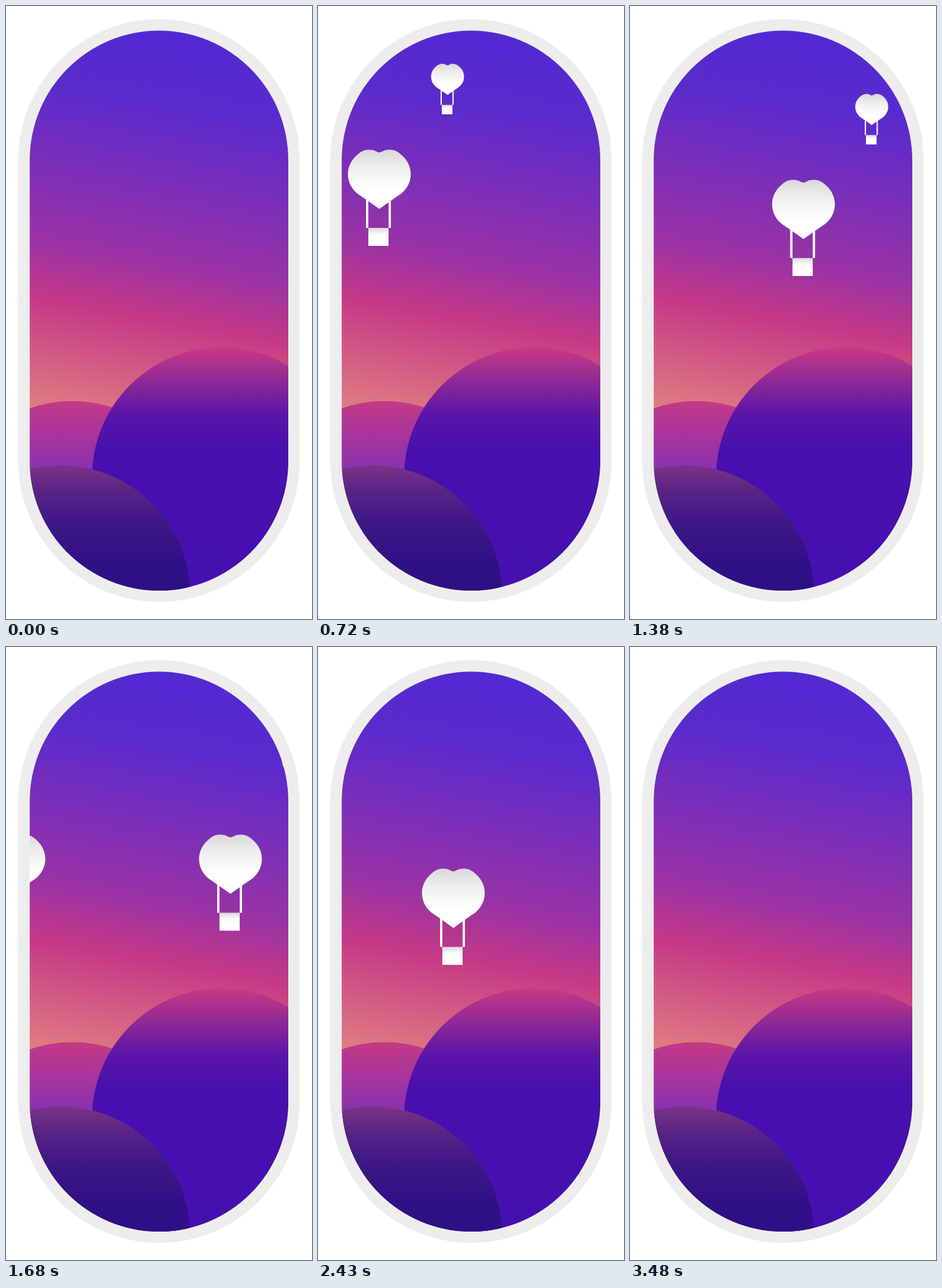
Write an HTML page with a canvas that moves like this. It is 529 by 1058 pixels and loops after 3.54 s.

```html
<!DOCTYPE html>
<html lang="en">
<head>
<meta charset="utf-8">
<title>Balloons at dusk</title>
<style>
  html, body { margin: 0; width: 100%; height: 100%; overflow: hidden; background: #fff; }
  canvas { display: block; width: 529px; height: 1058px; }
</style>
</head>
<body>
<canvas id="stage"></canvas>
<script>
const W = 529, H = 1058, LOOP = 3540, STEP = 30;
const SPEED = { x: 0.2938, y: 0.0788 }; // px per ms

const canvas = document.getElementById('stage');
const ctx = canvas.getContext('2d');
const ratio = window.devicePixelRatio || 1;
canvas.width = W * ratio;
canvas.height = H * ratio;

function gradient(x0, y0, x1, y1, stops) {
  const g = ctx.createLinearGradient(x0, y0, x1, y1);
  for (const [at, color] of stops) g.addColorStop(at, color);
  return g;
}

function pill(x, y, w, h) {
  const p = new Path2D();
  p.roundRect(x, y, w, h, w / 2);
  return p;
}

const frame = pill(21.2, 22.5, 486.6, 1006);
const view = pill(41, 42.5, 447, 966.5);

// Sky runs at 190deg, like a CSS gradient over the inner pill
const angle = 190 * Math.PI / 180;
const dx = Math.sin(angle) * 515, dy = -Math.cos(angle) * 515;
const sky = gradient(264.5 - dx, 525.5 - dy, 264.5 + dx, 525.5 + dy, [
  [0, '#4f29d4'], [0.16, '#5a2bcc'], [0.42, '#9a33a4'],
  [0.515, '#c43985'], [0.7, '#df7f80'], [1, '#e8a07c']
]);

const R = 223.5;
const hills = [
  { x: 114.5, top: 682, stops: [[0, '#c43985'], [0.19, '#9a33a4'], [0.4, '#6a2dc3']] },
  { x: 372.3, top: 589, stops: [[0, '#c83a83'], [0.12, '#932a95'], [0.26, '#5a15a8'], [0.4, '#4510ae'], [1, '#4510b0']] },
  { x: 95, top: 793.3, stops: [[0, '#7a3386'], [0.1, '#582484'], [0.22, '#3d1886'], [0.38, '#2e1084'], [1, '#2c1084']] }
].map(h => ({ ...h, fill: gradient(0, h.top, 0, h.top + 2 * R, h.stops) }));

// Balloon parts are placed around the heart's top centre
const heart = new Path2D(
  'M0 4.8C-5 4.8-6 0-18 0C-27 0-33 4-40 10.5C-49 19-54.3 30-54.3 42' +
  'C-54.3 56-48 66.5-40 74C-37 77-30 81-23 86L0 102.3' +
  'L23 86C30 81 37 77 40 74C48 66.5 54.3 56 54.3 42' +
  'C54.3 30 49 19 40 10.5C33 4 27 0 18 0C6 0 5 4.8 0 4.8Z');
const heartFill = gradient(0, 0, 0, 102, [[0, '#d9d9d9'], [0.3, '#efeeef'], [0.55, '#fbfafb'], [0.72, '#fff']]);
const basketFill = gradient(0, 135, 0, 166, [[0, '#d9d9d9'], [0.35, '#fbfafb'], [0.6, '#fff']]);

// Position of each balloon at time `at`
const balloons = [
  { at: 720, x: 106, y: 248, size: 1 },
  { at: 720, x: 224, y: 99.8, size: 0.525 },
  { at: 2430, x: 234, y: 382.6, size: 1 }
];

function drawBalloon(b, t) {
  ctx.save();
  ctx.translate(b.x + SPEED.x * (t - b.at), b.y + SPEED.y * (t - b.at));
  ctx.scale(b.size, b.size);
  ctx.fillStyle = '#fff';
  ctx.fillRect(-23, 80, 4, 55);
  ctx.fillRect(16, 80, 4, 55);
  ctx.fillStyle = heartFill;
  ctx.fill(heart);
  ctx.fillStyle = basketFill;
  ctx.fillRect(-19, 135, 35, 31);
  ctx.restore();
}

function draw(t) {
  ctx.setTransform(ratio, 0, 0, ratio, 0, 0);
  ctx.fillStyle = '#fff';
  ctx.fillRect(0, 0, W, H);
  ctx.fillStyle = '#ededed';
  ctx.fill(frame);

  ctx.save();
  ctx.clip(view);
  ctx.fillStyle = sky;
  ctx.fillRect(0, 0, W, H);
  for (const h of hills) {
    ctx.fillStyle = h.fill;
    ctx.beginPath();
    ctx.arc(h.x, h.top + R, R, 0, Math.PI * 2);
    ctx.fill();
  }
  for (const b of balloons) drawBalloon(b, t);
  ctx.restore();
}

const start = performance.now();
function tick() {
  const t = (performance.now() - start) % LOOP;
  draw(Math.floor(t / STEP) * STEP);
  requestAnimationFrame(tick);
}
tick();
</script>
</body>
</html>
```
